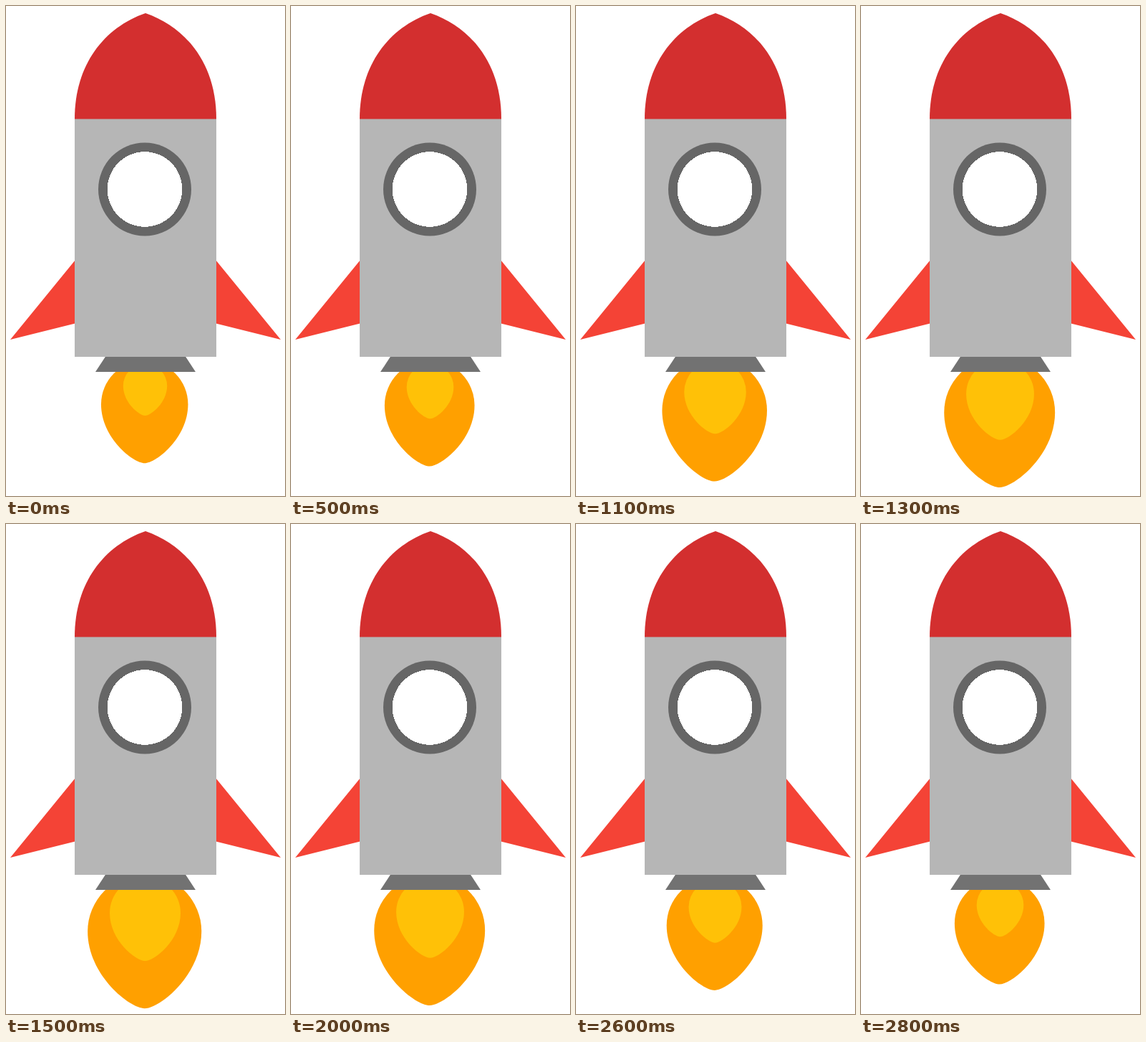
An HTML page that plays this animation: 390x683 px, repeating every 3 s.

```html
<!DOCTYPE html>
<html lang="en">
<head>
<meta charset="utf-8">
<title>Rocket</title>
<style>
  html, body { margin: 0; height: 100%; overflow: hidden; background: #fff; }
  svg { display: block; width: 390px; height: 683px; }
</style>
</head>
<body>
<svg viewBox="0 0 390 683">
  <path id="outer" fill="#ffa000"/>
  <path id="inner" fill="#ffc107"/>
  <path fill="#fff" d="M90 440H300V510H90Z"/>
  <path fill="#f44336" d="M96.500 354.500L6 465L96.500 442.500ZM293.500 354.500L384 465L293.500 442.500Z"/>
  <path fill="#727272" d="M139.500 488H250.500L265 510H125Z"/>
  <path fill="#b6b6b6" d="M96 157H294V489H96Z"/>
  <path fill="#d32f2f" d="M96 157.500C96 82 137 30 195 10C253 30 294 82 294 157.500Z"/>
  <circle cx="194" cy="255.500" r="65" fill="#666"/>
  <circle cx="194" cy="255.500" r="52.300" fill="#fff" shape-rendering="crispEdges"/>
</svg>
<script>
  const LOOP = 3000, HALF = LOOP / 2;
  const outer = document.getElementById('outer');
  const inner = document.getElementById('inner');

  // Teardrop: a half circle on top, tapering to a soft tip below.
  function flame(cx, tip, r) {
    const h = r * 1.35, cy = tip - h;
    const p = (x, y) => `${cx + x * r} ${cy + y * h} `;
    return `M${p(-1, 0)}A${r} ${r} 0 0 1 ${p(1, 0)}` +
      `C${p(1, .57)}${p(.26, 1)}${p(0, 1)}` +
      `C${p(-.26, 1)}${p(-1, .57)}${p(-1, 0)}Z`;
  }

  // Ten sizes, 0 to 9, resting longer at both ends of each half.
  function level(t) {
    const phase = t % HALF;
    const step = Math.max(phase >= 500 ? 1 : 0, Math.min(8, Math.floor(phase / 100) - 5));
    return t < HALF ? step : 9 - step;
  }

  function draw(now) {
    const n = level(now % LOOP);
    outer.setAttribute('d', flame(193.7, 637.3 + 4.22 * n, 60.75 + 2.09 * n));
    inner.setAttribute('d', flame(194.5, 571 + 4.22 * n, 30.7 + 2.09 * n));
    requestAnimationFrame(draw);
  }
  draw(0);
</script>
</body>
</html>
```
